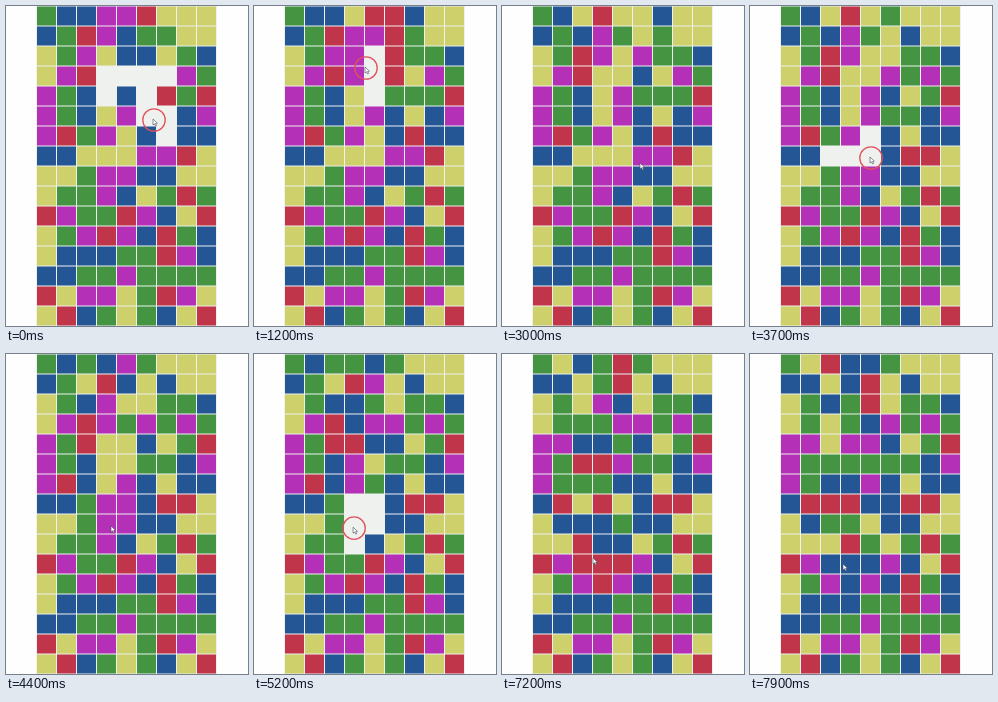
An HTML page with a canvas for the animation above (8 s loop, 242 by 320 pixels).

```html
<!DOCTYPE html>
<html lang="en">
<head>
<meta charset="utf-8">
<title>Falling blocks</title>
<style>
html, body { margin: 0; width: 100%; height: 100%; overflow: hidden; background: #fdfefd; }
canvas { display: block; width: 242px; height: 320px; }
</style>
</head>
<body>
<canvas id="stage" width="242" height="320"></canvas>
<script>
const ctx = document.getElementById('stage').getContext('2d');
const LOOP = 8000, COLS = 9, ROWS = 16, SIZE = 20, LEFT = 31;
const HOLD = 300, FALL = 150, RING = 250;
const COLORS = { G: '#459442', B: '#245696', M: '#b430b6', R: '#c1354a', Y: '#cdd06b' };

// Opening board; dots are cells already cleared.
const board = [
  'GBBMMRYYY', 'BGRMBGGYY', 'YGMYBBYGB', 'YMR....MG',
  'MGB.B.RGR', 'MGBYM..BM', 'MRGMYB.BB', 'BBYYYMMRY',
  'YYGMMBBYY', 'YGGMBYGRG', 'RMGGRMBYR', 'YGMRMBRGB',
  'YBBBGGRMB', 'BBGGMGGGG', 'RYMMYGRMY', 'YRBGYGBYR'
];

// Blocks that drop in at the top of each column, in order.
const supply = ['', 'Y', 'YGRBGYYBYR', 'MYMMRBBRGRBGMGGBB', 'RYYGYBMGMBRRB',
  'RRRBMYYG', 'GGBY', '', ''].map(s => [...s]);

// time, column, row, pointer x, pointer y
const clicks = [
  [1100, 4, 3, 112, 62],
  [1750, 3, 2, 101, 52],
  [2300, 5, 2, 141, 52],
  [3100, 5, 7, 139, 158],
  [3700, 4, 7, 121, 152],
  [4500, 3, 8, 106, 173],
  [5000, 3, 8, 102, 172],
  [5500, 2, 9, 84, 192],
  [6100, 2, 10, 85, 208],
  [6650, 3, 10, 98, 207],
  [7250, 3, 10, 92, 205]
];
const path = [[0, 148, 114], [400, 148, 114],
  ...clicks.flatMap(([t, , , x, y]) => [[t - 100, x, y], [t + 150, x, y]]),
  [7850, 94, 211], [LOOP, 94, 211]];

function clear(cols, c, r) {
  const next = cols.map(col => [...col]);
  const color = cols[c][r];
  const flood = (x, y) => {
    if (!next[x] || next[x][y] !== color) return;
    next[x][y] = '.';
    flood(x + 1, y); flood(x - 1, y); flood(x, y + 1); flood(x, y - 1);
  };
  flood(c, r);
  return next;
}

// Returns the settled board and how many rows each block has dropped.
function settle(cols) {
  const drop = [];
  const next = cols.map((col, c) => {
    const kept = [], moved = [];
    let gaps = 0;
    for (let r = ROWS - 1; r >= 0; r--) {
      if (col[r] === '.') gaps++;
      else { kept.unshift(col[r]); moved.unshift(gaps); }
    }
    for (let i = 0; i < gaps; i++) {
      kept.unshift(supply[c].shift() || 'Y');
      moved.unshift(gaps);
    }
    drop.push(moved);
    return kept;
  });
  return { cols: next, drop };
}

const phases = [];
let cols = Array.from({ length: COLS }, (_, c) => board.map(row => row[c]));
function collapse(start, fallAt) {
  phases.push({ start, cols });
  const settled = settle(cols);
  cols = settled.cols;
  phases.push({ start: fallAt, ...settled });
}
collapse(0, 400);
for (const [t, c, r] of clicks) {
  cols = clear(cols, c, r);
  collapse(t, t + HOLD);
}

function drawBoard(t) {
  const phase = phases.filter(p => p.start <= t).pop();
  const k = Math.min(1, (t - phase.start) / FALL);
  const lift = phase.drop ? 1 - k * k : 0;
  ctx.fillStyle = '#eef1ee';
  ctx.fillRect(LEFT - 1, 0, COLS * SIZE + 1, 320);
  phase.cols.forEach((col, c) => col.forEach((cell, r) => {
    if (cell === '.') return;
    const up = lift ? phase.drop[c][r] * lift : 0;
    ctx.fillStyle = COLORS[cell];
    ctx.fillRect(LEFT + c * SIZE, (r - up) * SIZE + 0.5, SIZE - 1, SIZE - 1);
  }));
}

function pointerAt(t) {
  const i = Math.max(1, path.findIndex(p => p[0] >= t));
  const [t0, x0, y0] = path[i - 1], [t1, x1, y1] = path[i];
  const k = (t - t0) / (t1 - t0), e = k * k * (3 - 2 * k);
  return [x0 + (x1 - x0) * e, y0 + (y1 - y0) * e];
}

function drawPointer(t) {
  const [x, y] = pointerAt(t);
  if (t < RING || clicks.some(([s]) => t >= s && t < s + RING)) {
    ctx.strokeStyle = '#e0525c';
    ctx.lineWidth = 1.3;
    ctx.beginPath();
    ctx.arc(x, y, 11.2, 0, Math.PI * 2);
    ctx.stroke();
  }
  ctx.beginPath();
  [[0, 0], [0, 6], [1.5, 4.8], [2.6, 7], [3.6, 6.5], [2.6, 4.4], [4.4, 4.2]]
    .forEach(([dx, dy]) => ctx.lineTo(x - 1 + dx, y - 1 + dy));
  ctx.closePath();
  ctx.fillStyle = '#fff';
  ctx.strokeStyle = '#44485c';
  ctx.lineWidth = 0.6;
  ctx.fill();
  ctx.stroke();
}

const begin = performance.now();
function frame() {
  const t = (performance.now() - begin) % LOOP;
  ctx.fillStyle = '#fdfefd';
  ctx.fillRect(0, 0, 242, 320);
  drawBoard(t);
  drawPointer(t);
  requestAnimationFrame(frame);
}
frame();
</script>
</body>
</html>
```
